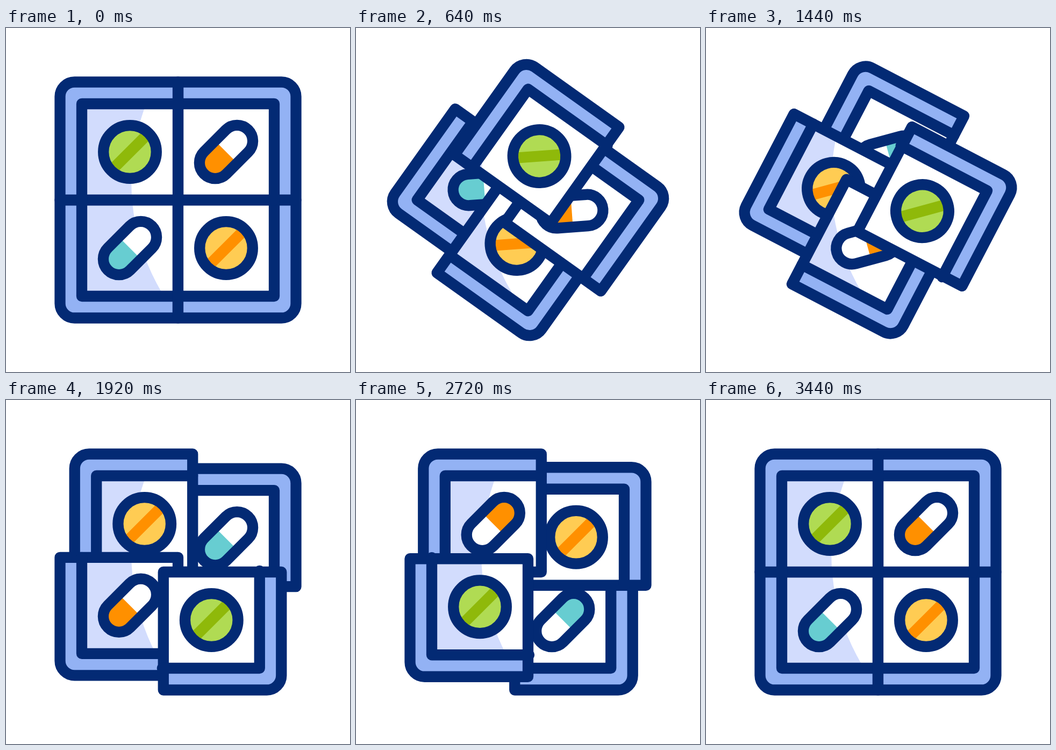
Write an HTML page with a canvas that moves like this. It is 640 px wide and 640 px high and loops after 3600 ms.

```html
<!DOCTYPE html>
<html lang="en">
<head>
<meta charset="utf-8">
<title>Pill box</title>
<style>
  html, body { margin: 0; width: 100%; height: 100%; overflow: hidden; background: #fff; }
  canvas { display: block; width: 640px; height: 640px; }
</style>
</head>
<body>
<canvas id="stage" width="640" height="640"></canvas>
<script>
const ctx = document.getElementById('stage').getContext('2d');
const LOOP = 3600, TAU = Math.PI * 2, QUARTER = Math.PI / 2;
const NAVY = '#032a74', FRAME = '#93b2f4', SHADE = '#d2dcfd';
const HALF = 109.75;   // half a tile
const INNER = -69.25;  // inner wall of the tray
const PILL = 20.25;    // pill centre inside a tile

// Start times of the four quarter turns
const SLIDE = [0, 809, 1597, 2411];
const TURN = [395, 1222, 2022, 2835];
const SPIN = [447, 1274, 2074, 2879];

// Bottom to top; seat counts clockwise from the top left
const tiles = [
  { seat: 3, capsule: '#67cdd1' },
  { seat: 2, tablet: '#ffcc53', band: '#ff9000' },
  { seat: 1, capsule: '#ff9000' },
  { seat: 0, tablet: '#b0db53', band: '#8fb90a', overhang: 2 }
];

const clamp = x => Math.min(1, Math.max(0, x));
const smooth = x => x * x * (3 - 2 * x);
const sum = (list, fn) => list.reduce((total, v) => total + fn(v), 0);

// Same curve as cubic-bezier(a, 0, 1, 1)
function easeIn(x, a) {
  x = clamp(x);
  if (x === 0 || x === 1) return x;
  let lo = 0, hi = 1;
  for (let i = 0; i < 24; i++) {
    const u = (lo + hi) / 2;
    if (3 * a * u * (1 - u) ** 2 + smooth(u) < x) lo = u; else hi = u;
  }
  return smooth(lo);
}

// Half a turn that overshoots, then settles
function spin(t) {
  const deg = t < 383 ? 192 * easeIn(t / 383, 0.667)
                      : 192 - 12 * smooth(clamp((t - 383) / 180));
  return deg * Math.PI / 180;
}

function paint(fill) {
  ctx.fillStyle = fill;
  ctx.fill();
}

function drawTray(overhang = 0) {
  ctx.beginPath();
  ctx.roundRect(-HALF, -HALF, 2 * HALF, 2 * HALF, [27, 0, 0, 0]);
  paint(FRAME);

  ctx.save();
  ctx.beginPath();
  ctx.rect(INNER, INNER, HALF - INNER, HALF - INNER);
  ctx.clip();
  paint(SHADE);
  ctx.resetTransform();
  ctx.beginPath();
  ctx.arc(633.3, 287, 400, 0, TAU);
  paint('#fff');
  ctx.restore();

  ctx.beginPath();
  ctx.roundRect(-HALF, -HALF, 2 * HALF, 2 * HALF, [27, 0, 0, 0]);
  ctx.stroke();
  ctx.beginPath();
  ctx.moveTo(INNER, HALF + overhang);
  ctx.lineTo(INNER, INNER);
  ctx.lineTo(HALF + overhang, INNER);
  ctx.stroke();
}

function drawPill({ capsule, tablet, band }) {
  const shape = new Path2D();
  if (tablet) shape.arc(0, 0, 49.3, 0, TAU);
  else shape.roundRect(-58, -29.3, 116, 58.6, 29.3);
  ctx.save();
  ctx.clip(shape);
  ctx.fillStyle = tablet || '#fff';
  ctx.fillRect(-60, -60, 120, 120);
  ctx.fillStyle = band || capsule;
  if (tablet) ctx.fillRect(-60, -10.2, 120, 20.4);
  else ctx.fillRect(-60, -60, 60, 120);
  ctx.restore();
  ctx.stroke(shape);
}

function draw(t) {
  const slide = sum(SLIDE, s => easeIn((t - s) / 788, 0.715));
  const turn = QUARTER * sum(TURN, s => easeIn((t - s) / 365, 0.667));
  const swing = sum(SPIN, s => spin(t - s));
  const step = Math.floor(slide);

  ctx.fillStyle = '#fff';
  ctx.fillRect(0, 0, 640, 640);
  ctx.strokeStyle = NAVY;
  ctx.lineWidth = 20.3;
  ctx.lineJoin = ctx.lineCap = 'round';

  for (const tile of tiles) {
    const side = QUARTER * (tile.seat + step);
    const angle = QUARTER * tile.seat + turn;
    ctx.save();
    ctx.translate(320, 320);
    ctx.rotate(side);
    ctx.translate(-HALF + 2 * HALF * (slide - step), -HALF);
    ctx.rotate(angle - side);
    drawTray(tile.overhang);
    ctx.translate(PILL, PILL);
    ctx.rotate(swing - Math.PI / 4 - angle);
    drawPill(tile);
    ctx.restore();
  }
}

function tick() {
  draw(performance.now() % LOOP);
  requestAnimationFrame(tick);
}
tick();
</script>
</body>
</html>
```
